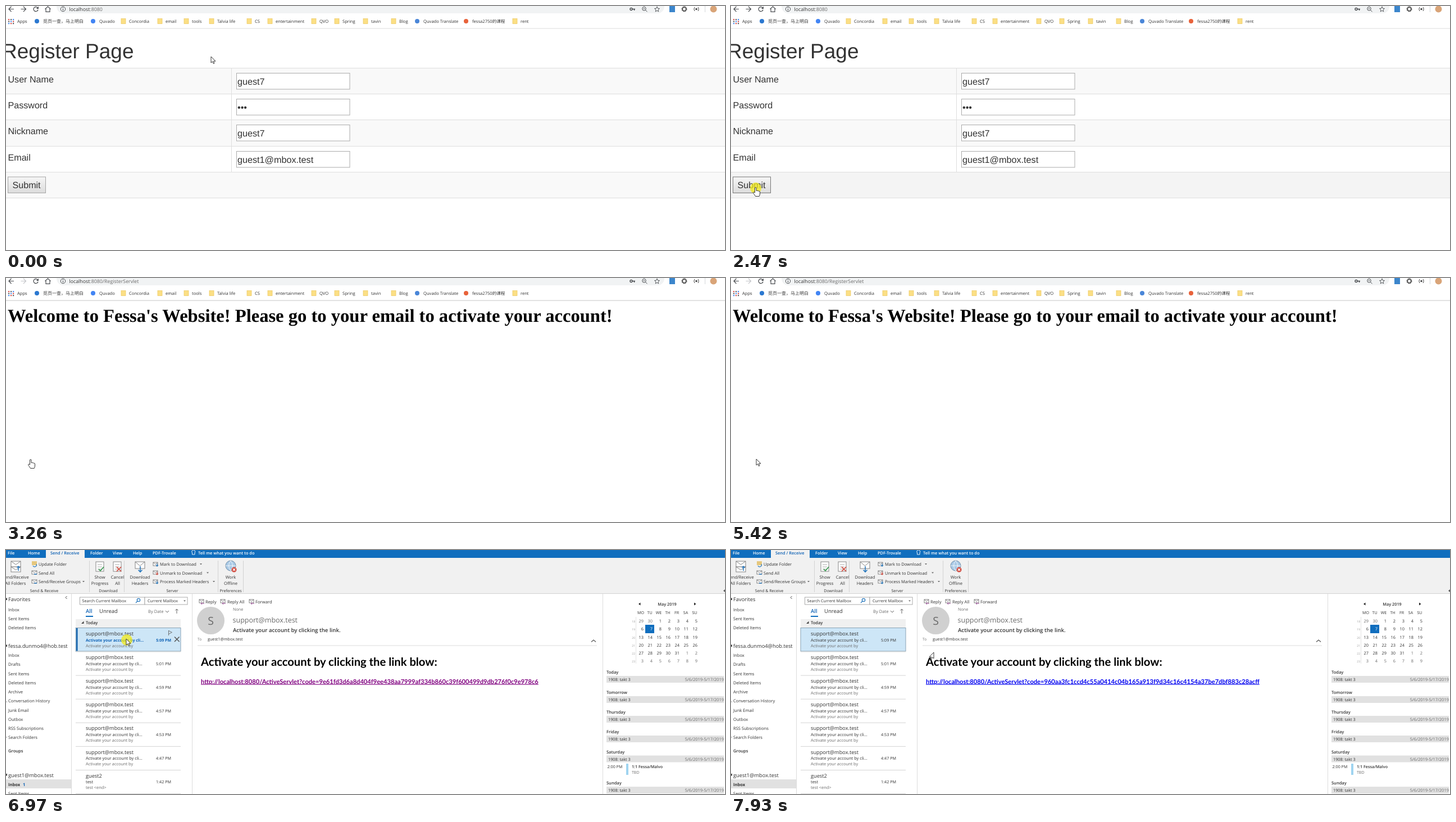
Animation, 1280 px wide and 434 px high, one loop 7.99 s. Source, as an HTML page:

```html
<!DOCTYPE html>
<html lang="en">
<head>
<meta charset="utf-8">
<title>Registration walkthrough</title>
<style>
html, body { margin: 0; width: 100%; height: 100%; overflow: hidden; background: #fff; }
svg { display: block; width: 100%; height: 100%; }
text { font-family: "Open Sans", "Noto Sans CJK SC", "Noto Sans CJK", sans-serif; fill: #333; white-space: pre; text-rendering: geometricPrecision; }
.arial { font-family: "Liberation Sans", Arial, sans-serif; }
.times { font-family: "Liberation Serif", "Times New Roman", serif; font-weight: 700; fill: #000; }
.lato { font-family: Lato, sans-serif; font-weight: 700; fill: #000; }
.semi { font-weight: 600; }
.bold { font-weight: 700; }
.mid { text-anchor: middle; }
.end { text-anchor: end; }
.grey { fill: #6a6a6a; }
.pale { fill: #999; }
.white { fill: #fff; }
.blue { fill: #0f62b5; }
</style>
</head>
<body>
<svg id="stage" viewBox="0 0 1280 434" preserveAspectRatio="none"></svg>
<script>
const LOOP = 7990;
const stage = document.getElementById('stage');

const escape = s => String(s).replace(/&/g, '&amp;').replace(/</g, '&lt;');
const text = (x, y, size, str, cls = '') =>
  `<text x="${x}" y="${y}" font-size="${size}" class="${cls}">${escape(str)}</text>`;
const rect = (x, y, w, h, fill, more = '') =>
  `<rect x="${x}" y="${y}" width="${w}" height="${h}" fill="${fill}" ${more}/>`;
const line = (d, color = '#444', width = 1, fill = 'none') =>
  `<path d="${d}" stroke="${color}" stroke-width="${width}" fill="${fill}"/>`;
const shape = (d, fill) => `<path d="${d}" fill="${fill}"/>`;
const dot = (x, y, r, fill, more = '') => `<circle cx="${x}" cy="${y}" r="${r}" fill="${fill}" ${more}/>`;
const group = (id, ...parts) => `<g id="${id}">${parts.join('')}</g>`;
const each = (list, fn) => list.map(fn).join('');

// Browser chrome
const bookmarks = [
  [66, '觅页一查，马上明白', '#2b78d0'], [166, 'Quvado', '#4285f4'], [219, 'Concordia'], [284, 'email'],
  [331, 'tools'], [376, 'Talvia life'], [443, 'CS'], [480, 'entertainment'], [558, 'QVO'],
  [599, 'Spring'], [650, 'tavin'], [700, 'Blog'], [743, 'Quvado Translate', '#4a86d8'],
  [830, 'fessa2750的课程', '#e8623a'], [916, 'rent']
];

function bookmark([x, label, logo]) {
  const icon = logo ? dot(x - 11, 27, 4, logo)
    : rect(x - 14, 22.5, 8, 9, '#fbdf85', 'stroke="#ecc75c" stroke-width=".7"');
  return icon + text(x, 30, /[^\x00-\x7f]{5}/.test(label) ? 8 : 7.6, label);
}

function browser() {
  const apps = each([0, 1, 2], r => each([0, 1, 2], c =>
    rect(4 + c * 4, 23 + r * 3.5, 2.2, 2.2, ['#d9534f', '#5f6368', '#4c8bf5'][(r + c) % 3])));
  return rect(0, 0, 1280, 434, '#fff') +
    rect(90, -12, 1082, 25, '#f1f3f4', 'rx="12"') +
    line('M14 5.5H5M9.5 1L5 5.5L9.5 10', '#4a4d51', 1.2) +
    `<path id="forward" d="M26.500 5.5H35.500M31 1L35.500 5.500L31 10" fill="none" stroke-width="1.2"/>` +
    group('reload', line('M56.500 3.500A4 4 0 1 0 57 6.500', '#4a4d51', 1.3), shape('M58 .8V5H53.800Z', '#4a4d51')) +
    group('cancel', line('M49.500 2L56.500 9M56.500 2L49.500 9', '#4a4d51', 1.3)) +
    line('M69.500 5.500L74.500 1L79.500 5.500M71 5V10.300H78V5', '#4a4d51', 1.2) +
    dot(101.5, 5.5, 4.2, 'none', 'stroke="#4a4d51"') + line('M101.500 5V8M101.500 2.800V4', '#4a4d51', 1.1) +
    `<text x="112.500" y="9" font-size="8.800">localhost<tspan class="grey">:8080</tspan><tspan class="grey" id="path">/RegisterServlet</tspan></text>` +
    dot(1113, 5.5, 2, 'none', 'stroke="#4a4d51" stroke-width="1.4"') + line('M1115 5.500H1120M1118.500 5.500V8', '#4a4d51', 1.4) +
    dot(1136, 4.8, 3.3, 'none', 'stroke="#4a4d51"') + line('M1138.500 7.300L1141.500 10.300M1134.500 4.800H1137.500', '#4a4d51') +
    line('M1159 1L1160.300 4.200L1163.500 4.500L1161 6.700L1161.800 10L1159 8.200L1156.200 10L1157 6.700L1154.500 4.500L1157.700 4.200Z', '#4a4d51', .9) +
    rect(1181, 0, 10, 11, '#3c86cc') +
    dot(1207.5, 5.5, 3.4, 'none', 'stroke="#555" stroke-width="2"') + dot(1207.5, 5.5, 4.6, 'none', 'stroke="#555" stroke-dasharray="1.8 1.8"') +
    line('M1226 2Q1223.500 5.500 1226 9M1232 2Q1234.500 5.500 1232 9', '#444') + dot(1229, 5.5, 1.7, '#444') +
    rect(1244, 0, 1, 11, '#d5d7da') + dot(1259.5, 5.5, 6, '#d9a478') +
    apps + text(20, 30, 7.6, 'Apps') + each(bookmarks, bookmark) +
    `<rect id="divider" x="0" y="39.500" width="1280" height="1"/>`;
}

// Registration form
const fields = [['User Name', 'guest7'], ['Password', '•••'], ['Nickname', 'guest7'], ['Email', 'guest1@mbox.test']];
const ROW = 46.2, TOP = 110.5;

function form() {
  const rows = each([0, 1, 2, 3, 4], i =>
    `<rect class="row" x="0" y="${TOP + i * ROW}" width="1280" height="${ROW}"/>`);
  const rules = each([0, 1, 2, 3, 4, 5], i => rect(0, Math.round(TOP + i * ROW - .5), 1280, 1, '#dedede'));
  const inputs = each(fields, ([label, value], i) => {
    const y = Math.round(i * ROW);
    return text(3.5, 136 + y, 16.1, label, 'arial') +
      rect(410.5, 119.5 + y, 201.5, 28.5, '#fff', 'stroke="#ababab"') +
      text(412, 140 + y, 16.2, value, 'arial');
  });
  return group('form', text(-7, 93, 37, 'Register Page', 'arial'), rows, rules,
    rect(401, 111, 1, 184, '#dedede'), inputs,
    `<rect id="submit" x="3.500" y="304" width="67" height="28.500" fill="url(#button)"/>`,
    text(11.5, 324, 16.1, 'Submit', 'arial'));
}

// Mail client
const caret = (x, y, s = 2) => shape(`M${x - s} ${y - 1}H${x + s}L${x} ${y + 1.2}Z`, '#666');
const envelope = (x, y, w = 12, h = 8) =>
  rect(x, y, w, h, '#fff', 'stroke="#777" stroke-width=".9"') +
  line(`M${x} ${y}L${x + w / 2} ${y + h * .6}L${x + w} ${y}`, '#777', .9);
const page = (x, y) => rect(x, y, 14, 17, '#fff', 'stroke="#888"') +
  line(`M${x + 3} ${y + 5}h8m-8 4h8m-8 4h8`, '#aaa');

function ribbon() {
  const tabs = [[3, 'File'], [39, 'Home'], [79, 'Send / Receive'], [150, 'Folder'], [190, 'View'],
    [226, 'Help'], [261, 'PDF-Trovale'], [342, 'Tell me what you want to do']];
  const large = [[17, 'Send/Receive', 'All Folders'], [167, 'Show', 'Progress'], [198.5, 'Cancel', 'All'],
    [238.5, 'Download', 'Headers'], [400, 'Work', 'Offline']];
  const small = [[58, 28, 'Update Folder'], [58, 43.5, 'Send All'], [58, 59, 'Send/Receive Groups', 138],
    [274, 28, 'Mark to Download', 347], [274, 43.5, 'Unmark to Download', 359], [274, 59, 'Process Marked Headers', 370]];
  const titles = [[68, 'Send & Receive'], [182, 'Download'], [296, 'Server'], [400, 'Preferences']];
  return rect(0, 0, 1280, 14, '#106ebe') + rect(71, 0, 69, 15, '#f1f1f1') + rect(0, 14, 1280, 63.5, '#f1f1f1') +
    rect(0, 77, 1280, 1, '#d2d2d2') +
    each(tabs, ([x, s]) => text(x, 8, 7.4, s, 'semi ' + (x === 79 ? 'blue' : 'white'))) +
    line('M331.500 5A3 3 0 1 1 336 5V8H331.500Z', '#fff', .9) +
    each([148, 210, 377, 422], x => rect(x, 19, 1, 56, '#d2d2d2')) +
    each(large, ([x, a, b]) => text(x, 51, 7.6, a, 'mid') + text(x, 62, 7.6, b, 'mid')) +
    each(small, ([x, y, s, c]) => text(x, y, 7.55, s) + (c ? caret(c, y - 3) : '')) +
    each(titles, ([x, s]) => text(x, 75, 7.1, s, 'mid')) +
    envelope(9, 20, 17, 10) + envelope(9, 30, 17, 9) + line('M22 37V29M19.500 31.500L22 29L24.500 31.500', '#2878bd', 1.5) +
    rect(46, 20, 9, 7, '#e5c77d') + line('M48 28A3 3 0 0 0 54 25', '#2878bd', 1.2) +
    envelope(46, 37, 9, 6) + envelope(46, 53, 9, 6) + line('M50 43H55M50 59H55', '#2878bd', 1.4) +
    page(160, 21) + line('M165 34L168 37L174 30', '#3a9b52', 1.7) +
    page(191, 21) + line('M197 30L205 38M205 30L197 38', '#d14b3f', 1.7) +
    envelope(230, 21, 17, 12) + line('M239 29V39M235.500 35.500L239 39L242.500 35.500', '#2878bd', 1.6) +
    each([22, 37, 53], (y, i) => envelope(262, y, 8, 6) + line(`M269 ${y + 2}v5m-2 -2l2 2l2 -2`, ['#2878bd', '#d14b3f', '#2878bd'][i], 1.1)) +
    dot(400, 28, 9, '#a9c9e5', 'stroke="#6d8ca8"') + line('M391 28H409M400 19Q393 28 400 37M400 19Q407 28 400 37', '#fff', .8) +
    dot(406, 35, 4.5, '#d14b3f') + line('M404 33L408 37M408 33L404 37', '#fff', 1.2) +
    shape('M1277 72.500L1280 70V75Z', '#555');
}

function folders() {
  const column = (start, names) => each(names, (s, i) => text(4, start + i * 16.25, 7.6, s));
  return rect(116, 78, 1, 356, '#dcdcdc') +
    line('M108.500 82L106 84.500L108.500 87', '#444') +
    each([[91, 'Favorites'], [174, 'fessa.dunmo4@hob.test'], [403.5, 'guest1@mbox.test']], ([y, s]) =>
      shape(`M0 ${y - 5}L2 ${y - 6}V${y - 2}H0Z`, '#444') + text(4, y, 9.3, s)) +
    column(108.5, ['Inbox', 'Sent Items', 'Deleted Items']) +
    column(190, ['Inbox', 'Drafts', 'Sent Items', 'Deleted Items', 'Archive', 'Conversation History',
      'Junk Email', 'Outbox', 'RSS Subscriptions', 'Search Folders']) +
    text(4, 360, 7.6, 'Groups', 'semi') +
    line('M0 269L2 271M0 334L2 332', '#888', .8) +
    rect(0, 408, 116, 16, '#e1e1e1') + text(4, 419.5, 7.6, 'Inbox', 'bold') +
    group('unreadCount', text(30, 419.5, 7.6, '1', 'bold blue')) + text(4, 436, 7.6, 'Sent Items');
}

const SUBJECT = 'Activate your account by';
const times = ['5:09', '5:01', '4:59', '4:57', '4:53', '4:47', '1:42'];

function message(time, i) {
  const y = 138.5 + i * 42.1, own = i === 6;
  const subject = own ? 'test' : SUBJECT + ' cli...';
  const plain = text(142, y + 24, 7.5, subject) + text(294, y + 24, 7.2, time + ' PM', 'end');
  const fresh = text(142, y + 24, 7.05, subject, 'bold blue') + text(294, y + 24, 7, time + ' PM', 'bold blue end');
  return rect(124, y + 42, 187, 1, '#d4d4d4') +
    text(142, y + 13.5, 9.2, own ? 'guest2' : 'support@mbox.test') +
    (i ? plain : group('readLine', plain) + group('unreadLine', fresh, rect(125, 139, 2.5, 40.5, '#0f5fa9'))) +
    text(142, y + 34, 7.4, own ? 'test <end>' : SUBJECT, 'grey');
}

function messages() {
  return rect(331, 78, 1, 356, '#dcdcdc') +
    rect(131.5, 84, 115.5, 13, '#fff', 'stroke="#ababab"') + rect(247, 84, 76, 13, '#fff', 'stroke="#ababab"') +
    text(135.5, 93, 7.2, 'Search Current Mailbox') + text(252, 93, 7.2, 'Current Mailbox') + caret(318, 90.5) +
    dot(236, 89, 2.7, 'none', 'stroke="#2878bd" stroke-width="1.2"') + line('M234 91L231 94', '#2878bd', 1.3) +
    text(142, 112, 9.5, 'All', 'semi blue') + rect(142, 117, 13, 2, '#106ebe') + text(166, 112, 9.5, 'Unread') +
    text(253, 112, 7.6, 'By Date', 'grey') + line('M284 108L287 111L290 108M304 113V105M301.500 107.500L304 105L306.500 107.500', '#666') +
    rect(124, 123, 187, 15, '#f0f0f0') + shape('M134 131H138.500V126.500Z', '#444') + text(142, 132, 7.5, 'Today', 'semi') +
    rect(124, 138, 187, 1, '#d4d4d4') +
    `<rect id="first" x="124" y="138.500" width="187" height="41.500"/>` +
    group('second', rect(124, 180.5, 187, 42, '#e0e0e0')) +
    each(times, message) +
    group('actions', line('M289.500 152V143M289.500 143.500L295.500 146.500L289.500 149.500', '#666', .9),
      line('M300 154.500L308.500 163M308.500 154.500L300 163', '#555', 1.5));
}

const LINK = 'http://localhost:8080/ActiveServlet?code=';
function reading() {
  return each([[344, 355, 'Reply'], [382, 394, 'Reply All'], [433, 444, 'Forward']], ([x, tx, s]) =>
      envelope(x, 88, 8, 6) + line(`M${x + 9} 95H${x + 3}M${x + 5} 93L${x + 3} 95L${x + 5} 97`, '#9a4f96') + text(tx, 95, 7.7, s)) +
    dot(364.5, 125.5, 24.5, '#d0d0d0') + text(364.5, 132.5, 19.5, 'S', 'mid grey') +
    text(404, 108, 7.2, 'None', 'grey') + text(403.5, 129, 12.5, 'support@mbox.test', 'grey') +
    text(404, 146, 9.65, SUBJECT + ' clicking the link.', 'semi') +
    text(341, 161, 6.5, 'To', 'grey') + text(359, 161, 7.2, 'guest1@mbox.test') +
    rect(341, 169.5, 711, 1, '#dcdcdc') + line('M1042 163.500L1046 160L1050 163.500', '#555', 1.2) +
    text(347, 206, 20.2, SUBJECT + ' clicking the link blow:', 'lato') +
    `<text id="link" class="lato" x="347" y="237.500" font-size="11.120" text-decoration="underline"></text>`;
}

function agenda() {
  const column = c => 1130.5 + c * 16;
  const days = each([0, 1, 2, 3, 4, 5], r => {
    const y = 129 + r * 14.25;
    return text(1120, y, 5, 18 + r, 'end pale') + each([0, 1, 2, 3, 4, 5, 6], c => {
      const n = r * 7 + c - 1;
      const day = n < 1 ? n + 30 : n > 31 ? n - 31 : n;
      return text(column(c) + 4.5, y, 7.4, day, 'end ' + (n === 7 ? 'white' : n < 1 || n > 31 ? 'grey' : ''));
    });
  });
  const list = [['Today', 220], ['Tomorrow', 256], ['Thursday', 291], ['Friday', 326], ['Saturday', 361.5], ['Sunday', 417]];
  return rect(1062, 78, 1, 356, '#dcdcdc') +
    text(1177, 99, 7.3, 'May 2019', 'mid semi') +
    shape('M1126 96L1129.500 93.500V98.500ZM1228.500 96L1225 93.500V98.500Z', '#222') +
    each(['MO', 'TU', 'WE', 'TH', 'FR', 'SA', 'SU'], (s, c) => text(column(c) - .5, 114, 7.1, s, 'mid')) +
    rect(1121, 119, 1, 83, '#e4e4e4') + rect(1138, 133, 16, 15, '#106ebe') + days +
    each(list, ([s, y]) => text(1069, y, 7.5, s, 'semi') + rect(1069, y + 4, 209, 12, '#e1e1e1') +
      text(1072, y + 13, 7.3, '1908: takt 3') + text(1278, y + 13, 7.5, '5/6/2019-5/17/2019', 'end grey')) +
    text(1070.5, 388, 7.2, '2:00 PM') + rect(1104, 380, 4, 20, '#9fd4f0') +
    text(1114, 388, 7.2, '1:1 Fessa/Malvo', 'semi') + text(1114, 398, 7, 'TBD', 'grey');
}

const pointer = 'M0 0V11L2.600 8.700L4.300 12.600L6 11.900L4.400 8.100H8Z';
stage.innerHTML =
  `<defs><linearGradient id="button" x2="0" y2="1"><stop stop-color="#f6f6f6"/><stop offset="1" stop-color="#dcdcdc"/></linearGradient></defs>` +
  group('browser', browser(), form(),
    group('welcome', text(3, 78, 32.4, "Welcome to Fessa's Website! Please go to your email to activate your account!", 'times'))) +
  group('mail', rect(0, 0, 1280, 434, '#fff'), ribbon(), folders(), messages(), reading(), agenda()) +
  group('cursor', dot(1, 2, 10, '#f2ea18', 'id="glow" fill-opacity=".75"'),
    group('arrow', line(pointer, '#222', .9, '#fff')),
    group('flipped', `<g transform="translate(7) scale(-1 1)">${line(pointer, '#222', .9, '#fff')}</g>`),
    group('hand', line('M-.500 10V2Q-.500 .7 .8 .7T2 2V6.500Q3 5.700 4.200 6.800Q5.300 6.100 6.300 7.300Q8.500 6.800 8.500 9V12Q8.500 14 7.200 16.500H.500Q-1.500 13 -3.300 10.800Q-3.700 9 -2 9Z', '#222', .9, '#fff')));
document.querySelector('#welcome text').setAttribute('font-size', 32.6);

const el = id => document.getElementById(id);
const rows = [...document.querySelectorAll('.row')];
const show = (id, on) => { el(id).style.display = on ? '' : 'none'; };
const paint = (id, attrs) => { for (const k in attrs) el(id).setAttribute(k, attrs[k]); };

// Pointer legs: start, last step, number of steps, destination
const legs = [
  [290, 1070, 11, 152, 267], [1140, 1840, 9, 43, 322], [5340, 5420, 2, 45, 322],
  [6350, 6350, 1, 224, 161], [6580, 6740, 3, 214, 158], [7760, 7930, 3, 354, 182]
];

function pointerAt(time) {
  let x = 365, y = 90;
  for (const [start, end, steps, toX, toY] of legs) {
    if (time < start) break;
    const done = time >= end ? 1 : (Math.floor((time - start) / (end - start) * (steps - 1)) + 1) / steps;
    const ease = steps > 5 ? done * done * (3 - 2 * done) : done;
    x += (toX - x) * ease;
    y += (toY - y) * ease;
  }
  return [x, y];
}

function draw(time) {
  const within = (a, b) => time >= a && time < b;
  const [x, y] = pointerAt(time);
  const mail = time >= 6350, sent = time >= 3020, loading = within(2740, 3260);

  show('browser', !mail);
  show('mail', mail);
  show('form', !sent);
  show('welcome', sent);
  show('path', sent);
  show('reload', !loading);
  show('cancel', loading);
  paint('forward', { stroke: sent ? '#c4c6c9' : '#4a4d51' });
  paint('divider', { fill: sent ? '#c6c6c6' : '#dedede' });

  const hovered = Math.floor((y - TOP) / ROW);
  rows.forEach((row, i) => row.setAttribute('fill', i === hovered ? '#f4f4f4' : i % 2 ? '#fff' : '#f9f9f9'));
  const onButton = x < 71 && y > 304 && y < 333;
  paint('submit', { stroke: onButton ? '#777' : '#a5a5a5' });

  const selected = time >= 6970, read = time >= 7550;
  paint('first', { fill: selected ? '#cde6f7' : '#e5f1fb', stroke: selected ? '#8aa3b5' : 'none' });
  show('second', !selected);
  show('readLine', read);
  show('unreadLine', !read);
  show('unreadCount', !read);
  show('actions', x < 300);
  const loaded = time >= 7220;
  el('link').textContent = LINK + (loaded
    ? '960aa3fc1ccd4c55a0414c04b165a913f9d34c16c4154a37be7dbf883c28acff'
    : '9e61fd3d6a8d404f9ee438aa7999af334b860c39f600499d9db276f0c9e978c6');
  el('link').style.fill = loaded ? '#0000f0' : '#800080';

  const hand = onButton && time < 5340, flipped = mail && x > 331;
  show('hand', hand);
  show('flipped', flipped);
  show('arrow', !hand && !flipped);
  show('glow', within(2470, 2640) || within(6880, 7130));
  paint('cursor', { transform: `translate(${x.toFixed(1)} ${y.toFixed(1)})` });
}

const began = performance.now();
function tick() {
  draw((performance.now() - began) % LOOP);
  requestAnimationFrame(tick);
}
tick();
</script>
</body>
</html>
```
